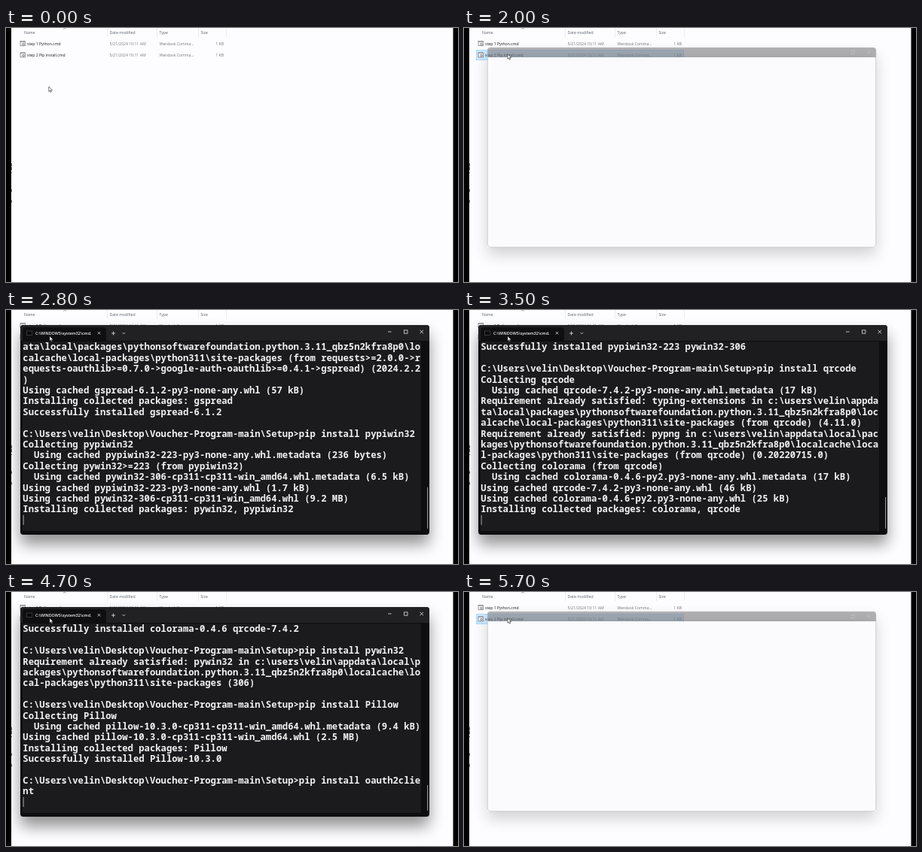
Animation of 600x338 px, one loop 5800 ms. Source, as an HTML page:

```html
<!DOCTYPE html>
<html lang="en">
<head>
<meta charset="utf-8">
<title>Package setup</title>
<style>
html, body { margin: 0; width: 100%; height: 100%; overflow: hidden; background: #fdfcfe; }
svg { display: block; width: 100vw; height: 100vh; }
text { white-space: pre; }
.ui { font: 5.15px "Open Sans", "Noto Sans", sans-serif; }
.head { fill: #5b6672; }
.name { fill: #1c1c1c; }
.meta { fill: #77777b; }
.tab { font: 600 5.3px "Open Sans", "Noto Sans", sans-serif; fill: #f4f4f4; }
.term { font: 600 12.23px "Noto Sans Mono", "DejaVu Sans Mono", monospace; }
</style>
</head>
<body>
<svg viewBox="0 0 600 338" preserveAspectRatio="none">
  <defs>
    <filter id="soft" x="-10%" y="-15%" width="120%" height="135%"><feGaussianBlur stdDeviation="10"/></filter>
    <clipPath id="pane"><rect x="20" y="42" width="541" height="252"/></clipPath>
    <clipPath id="page"><rect x="7" y="0" width="586.5" height="338"/></clipPath>
  </defs>
  <rect width="600" height="338" fill="#fdfcfe"/>

  <g id="explorer">
    <path d="M134.5 0V12M200.5 0V12M255.5 0V12M292.5 0V12" stroke="#ececf0"/>
    <path d="M76 1.6L78 0L80 1.6" fill="none" stroke="#888" stroke-width=".7"/>
    <g class="ui head">
      <text x="24" y="7.8">Name</text>
      <text x="137.5" y="7.8">Date modified</text>
      <text x="203.5" y="7.8">Type</text>
      <text x="258.5" y="7.8">Size</text>
    </g>
    <rect id="pick" x="16.5" y="29.5" width="275" height="13" stroke-width=".7"/>
    <g id="files" class="ui"></g>
    <path d="M7.5 180V184M7.5 185V189M7.5 192V193M7.5 214.5V218M7.5 229V232.5" stroke="#77777b"/>
  </g>

  <g clip-path="url(#page)">
    <g id="ghost">
      <rect x="31" y="36" width="516" height="266" rx="4" filter="url(#soft)" opacity=".17"/>
      <rect x="31" y="39" width="516" height="253" fill="#fdfcfe" opacity=".95"/>
      <path d="M31 39V30Q31 26 35 26H543Q547 26 547 30V39Z" fill="#808084" opacity=".6"/>
      <rect x="31.3" y="26.3" width="515.4" height="265.4" rx="4" fill="none" stroke="#b4b4b8" stroke-width=".6"/>
      <path d="M514 30.5H518V34.5H514ZM535 30.5L539 34.5M539 30.5L535 34.5" fill="none" stroke="#c8c8c8" stroke-width=".6"/>
    </g>

    <g id="win">
      <rect x="19" y="32" width="543" height="280" rx="5" filter="url(#soft)" opacity=".42"/>
      <rect x="19" y="20" width="543" height="279" rx="4" fill="#0e0d10"/>
      <path d="M19 41V24Q19 20 23 20H558Q562 20 562 24V41Z" fill="#212124"/>
      <path d="M22 41V27Q22 23 26 23H129Q133 23 133 27V41Z" fill="#0f0f12"/>
      <rect x="22" y="42" width="529" height="252" fill="#1b1a1c"/>
      <rect x="27.5" y="28" width="7" height="5.5" fill="#08080a" stroke="#55555a" stroke-width=".6"/>
      <text class="tab" x="39" y="33">C:\WINDOWS\system32\cmd.</text>
      <g fill="none" stroke="#e8e8e8" stroke-width=".8">
        <path d="M121.8 29L125.2 32.4M125.2 29L121.8 32.4"/>
        <path d="M140 31H145M142.5 28.5V33.5"/>
        <path d="M154.6 30L156.4 31.8L158.2 30"/>
        <path d="M507 29H511.5M528.5 26.8H533V31.2H528.5ZM549.5 26.8L554 31.2M554 26.8L549.5 31.2"/>
      </g>
      <g clip-path="url(#pane)">
        <g id="term" class="term"></g>
        <rect id="caret" x="22.6" width="1" height="13" fill="#a8a8a8"/>
      </g>
      <rect id="thumb" x="559" width="1.2" fill="#8e8e90"/>
    </g>
  </g>

  <path id="mouse" d="M0 0V6.6L1.5 5.2L2.5 7.4L3.5 6.9L2.5 4.8H4.6Z" fill="#fff" stroke="#222" stroke-width=".6"/>
  <path d="M0 0H7V338H0ZM593.5 0H600V338H593.5Z"/>
</svg>

<script>
const LOOP = 5800, STEP = 100, COLS = 72, ROWS = 17, PITCH = 14.4;
const OPENING = 2000, OPEN = 2100, CLOSING = 5700;
const WHITE = '#f1f1f1', YELLOW = '#f2ec1c';
const NS = 'http://www.w3.org/2000/svg';
const $ = id => document.getElementById(id);

function el(parent, tag, attrs, text = '') {
  const node = document.createElementNS(NS, tag);
  for (const k in attrs) node.setAttribute(k, attrs[k]);
  node.textContent = text;
  return parent.appendChild(node);
}
function set(id, attrs) {
  for (const k in attrs) $(id).setAttribute(k, attrs[k]);
}
const show = (id, on) => $(id).style.display = on ? '' : 'none';

// File list
['step 1 Python.cmd', 'step 2 Pip install.cmd'].forEach((name, i) => {
  const y = 23 + i * 15.2, files = $('files');
  el(files, 'rect', { x: 19, y: y - 5.5, width: 6.4, height: 6.2, fill: '#f6f6f8', stroke: '#77777b', 'stroke-width': .7 });
  el(files, 'path', { d: `M19 ${y - 4.6}H25.4`, stroke: '#77777b', 'stroke-width': .6 });
  el(files, 'circle', { cx: 23, cy: y - 1.5, r: 1.3, fill: 'none', stroke: '#667', 'stroke-width': .8 });
  el(files, 'text', { x: 28, y, class: 'name' }, name);
  el(files, 'text', { x: 137.5, y, class: 'meta' }, '5/21/2024 10:11 AM');
  el(files, 'text', { x: 203.5, y, class: 'meta' }, 'Wendask Comma...');
  el(files, 'text', { x: 289, y, class: 'meta', 'text-anchor': 'end' }, '1 KB');
});

// Terminal log: text is wrapped into lines, at() notes how much is out by then
const lines = [], marks = [];
const SITE = String.raw`c:\users\velin\appdata\local\packages\pythonsoftwarefoundation.python.3.11_qbz5n2kfra8p0\localcache\local-packages\python311\site-packages`;
const SCRIPTS = String.raw`C:\Users\velin\AppData\Local\Packages\PythonSoftwareFoundation.Python.3.11_qbz5n2kfra8p0\LocalCache\local-packages\Python311\Scripts`;

function out(text, fill = WHITE) {
  for (let i = 0; i === 0 || i < text.length; i += COLS)
    lines.push({ text: text.slice(i, i + COLS), fill });
}
const at = (time, caret = 1) => marks.push({ time, end: lines.length, caret });
const cmd = pkg => {
  out('');
  out(String.raw`C:\Users\velin\Desktop\Voucher-Program-main\Setup>pip install ` + pkg);
};
const collect = pkg => out('Collecting ' + pkg);
const cached = file => out('Using cached ' + file);
const meta = file => out('  Using cached ' + file);
const have = (pkg, tail) => out(`Requirement already satisfied: ${pkg} in ${SITE} ${tail}`);
const installing = list => out('Installing collected packages: ' + list);
const done = list => out('Successfully installed ' + list);
function warn(what) {
  out(`  WARNING: The ${what} installed in '${SCRIPTS}' which is not on PATH.`, YELLOW);
  out('  Consider adding this directory to PATH or, if you prefer to suppress this warning, use --no-warn-script-location.', YELLOW);
}

const OAUTH = 'google-auth-oauthlib>=0.4.1->gspread)';
const AUTH = '(from google-auth>=1.12.0->gspread)';
const REQ = '(from requests>=2.0.0->requests-oauthlib>=0.7.0->' + OAUTH;

cmd('gspread');
at(2300, 0);
collect('gspread');
meta('gspread-6.1.2-py3-none-any.whl.metadata (11 kB)');
at(2400);
have('google-auth>=1.12.0', '(from gspread) (2.29.0)');
have('google-auth-oauthlib>=0.4.1', '(from gspread) (1.2.0)');
have('cachetools<6.0,>=2.0.0', AUTH + ' (5.3.3)');
have('pyasn1-modules>=0.2.1', AUTH + ' (0.4.0)');
have('rsa<5,>=3.1.4', AUTH + ' (4.9)');
have('requests-oauthlib>=0.7.0', '(from ' + OAUTH + ' (2.0.0)');
have('pyasn1<0.7.0,>=0.4.6', '(from pyasn1-modules>=0.2.1->google-auth>=1.12.0->gspread) (0.6.0)');
have('oauthlib>=3.0.0', '(from requests-oauthlib>=0.7.0->' + OAUTH + ' (3.2.2)');
have('requests>=2.0.0', '(from requests-oauthlib>=0.7.0->' + OAUTH + ' (2.31.0)');
have('charset-normalizer<4,>=2', REQ + ' (3.3.2)');
have('idna<4,>=2.5', REQ + ' (3.7)');
have('urllib3<3,>=1.21.1', REQ + ' (2.2.1)');
have('certifi>=2017.4.17', REQ + ' (2024.2.2)');
cached('gspread-6.1.2-py3-none-any.whl (57 kB)');
installing('gspread');
at(2500);
done('gspread-6.1.2');
cmd('pypiwin32');
at(2600);
collect('pypiwin32');
meta('pypiwin32-223-py3-none-any.whl.metadata (236 bytes)');
collect('pywin32>=223 (from pypiwin32)');
meta('pywin32-306-cp311-cp311-win_amd64.whl.metadata (6.5 kB)');
cached('pypiwin32-223-py3-none-any.whl (1.7 kB)');
cached('pywin32-306-cp311-cp311-win_amd64.whl (9.2 MB)');
installing('pywin32, pypiwin32');
at(2800);
warn('scripts pywin32_postinstall.exe and pywin32_testall.exe are');
done('pypiwin32-223 pywin32-306');
cmd('qrcode');
at(3200);
collect('qrcode');
meta('qrcode-7.4.2-py3-none-any.whl.metadata (17 kB)');
at(3400);
have('typing-extensions', '(from qrcode) (4.11.0)');
have('pypng', '(from qrcode) (0.20220715.0)');
collect('colorama (from qrcode)');
meta('colorama-0.4.6-py2.py3-none-any.whl.metadata (17 kB)');
cached('qrcode-7.4.2-py3-none-any.whl (46 kB)');
cached('colorama-0.4.6-py2.py3-none-any.whl (25 kB)');
installing('colorama, qrcode');
at(3500);
warn('script qr.exe is');
done('colorama-0.4.6 qrcode-7.4.2');
cmd('pywin32');
at(3700);
have('pywin32', '(306)');
at(4000, 0);
cmd('Pillow');
at(4100);
collect('Pillow');
meta('pillow-10.3.0-cp311-cp311-win_amd64.whl.metadata (9.4 kB)');
cached('pillow-10.3.0-cp311-cp311-win_amd64.whl (2.5 MB)');
installing('Pillow');
at(4300);
done('Pillow-10.3.0');
cmd('oauth2client');
at(4600);
collect('oauth2client');
meta('oauth2client-4.1.3-py2.py3-none-any.whl.metadata (1.2 kB)');
collect('httplib2>=0.9.1 (from oauth2client)');
meta('httplib2-0.22.0-py3-none-any.whl.metadata (2.6 kB)');
at(4900);
have('pyasn1>=0.1.7', '(from oauth2client) (0.6.0)');
have('pyasn1-modules>=0.0.5', '(from oauth2client) (0.4.0)');
have('rsa>=3.1.4', '(from oauth2client) (4.9)');
have('six>=1.6.1', '(from oauth2client) (1.16.0)');
at(5100);
cached('oauth2client-4.1.3-py2.py3-none-any.whl (98 kB)');
cached('httplib2-0.22.0-py3-none-any.whl (96 kB)');
installing('httplib2, oauth2client');
at(5300);
done('httplib2-0.22.0 oauth2client-4.1.3');
at(5500);

const rows = Array.from({ length: ROWS }, (_, i) =>
  el($('term'), 'text', { x: 22.3, y: 53.4 + i * PITCH }));

function drawLog(t) {
  const now = marks.filter(m => m.time <= t).pop() || { end: 0, caret: 0 };
  const total = now.end + now.caret;
  const top = Math.max(0, total - ROWS);
  rows.forEach((row, i) => {
    const line = top + i < now.end ? lines[top + i] : { text: '', fill: WHITE };
    row.textContent = line.text;
    row.setAttribute('fill', line.fill);
  });
  show('caret', now.caret);
  set('caret', { y: 42.5 + (now.end - top) * PITCH });
  const h = 227 * ROWS / Math.max(total, ROWS);
  show('thumb', total > ROWS);
  set('thumb', { y: 291 - h, height: h });
}

function draw(time) {
  const t = Math.floor(time % LOOP / STEP) * STEP;
  const open = t >= OPEN && t < CLOSING;

  const p = Math.min(1, t / 500), ease = p * p * (3 - 2 * p);
  set('mouse', { transform: `translate(${56.8 + 1.2 * ease} ${78 - 43.3 * ease})` });

  show('pick', t >= 400 && !open);
  set('pick', t < 700 ? { fill: '#e5f3ff', stroke: '#e5f3ff' } : { fill: '#cce8ff', stroke: '#99d1ff' });

  show('ghost', t >= OPENING && !open);
  show('win', open);
  if (open) drawLog(t);
}

const start = performance.now();
function tick() {
  draw(performance.now() - start);
  requestAnimationFrame(tick);
}
tick();
</script>
</body>
</html>
```
